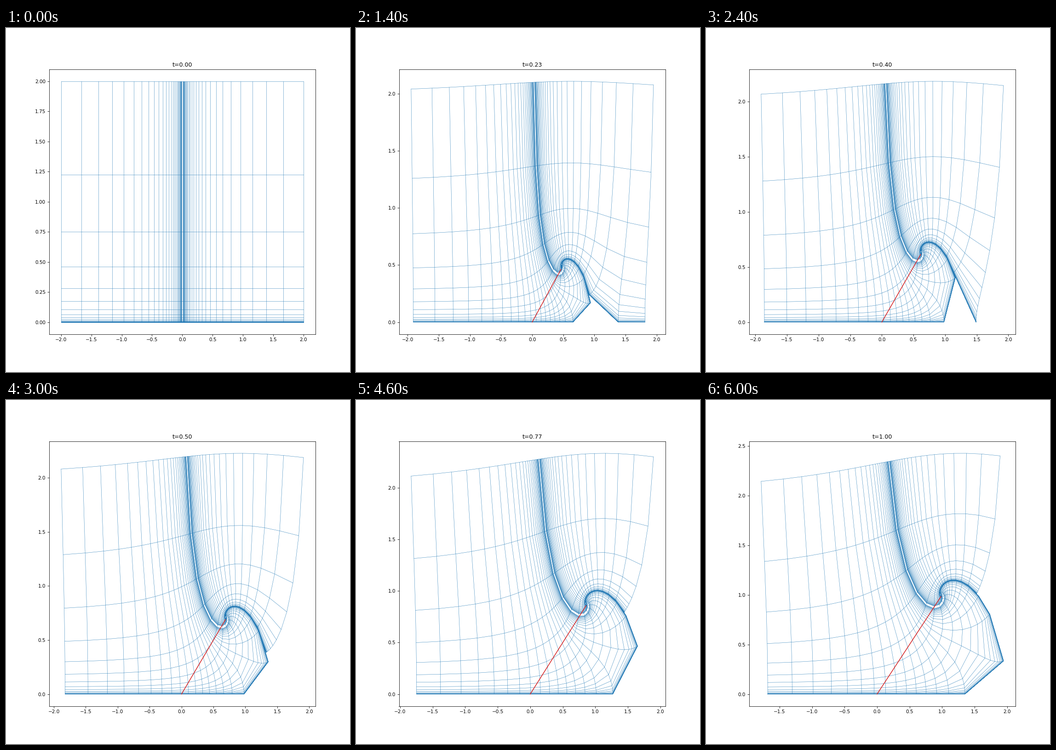
Animation of 748x748 px, one loop 6.1 s. Source, as a matplotlib script:

```python
import numpy as np
import matplotlib.pyplot as plt
from matplotlib.animation import FuncAnimation

INCHES, DPI = 10, 74.8
FRAMES = 61
INTERVAL = 100
BLUE, RED = "tab:blue", "tab:red"


def driving(s):
    """Driving term 2*sqrt(t), with s = sqrt(t)."""
    return 2 * s


def advance(z, t0, t1, n):
    """Flow dz/dt = -1 / (z - W(t)) as a chain of small slit maps."""
    s = np.linspace(np.sqrt(t0), np.sqrt(t1), n + 1)
    for a, b in zip(s[:-1], s[1:]):
        w = driving((a + b) / 2)
        h = np.sqrt(2 * (b * b - a * a))
        u = z - w
        # this product of roots stays in the upper half-plane
        z = w + np.sqrt(u - h) * np.sqrt(u + h)
    return z


def evolve(z, times):
    states = [z]
    for t0, t1 in zip(times[:-1], times[1:]):
        # the start is singular and needs finer steps
        n = 3000 if t0 == 0 else 150
        states.append(advance(states[-1], t0, t1, n))
    return states


x = np.geomspace(0.01, 2, 30)
y = np.geomspace(1e-8, 2, 40)
columns = np.concatenate([-x[::-1], x])

labels = np.linspace(0, 1, FRAMES)      # times shown in the title
times = np.arange(FRAMES) / FRAMES      # times reached by the flow
states = evolve(columns[None, :] + 1j * y[:, None], times)
trace = np.sqrt(times) * (1 + 1j)


def grid_curves(z):
    return [*z.T, *z]


fig, ax = plt.subplots(figsize=(INCHES, INCHES), dpi=DPI)
grid_lines = [ax.plot([], [], color=BLUE, lw=0.5)[0]
              for _ in grid_curves(states[0])]
tip_line, = ax.plot([], [], color=RED, lw=1.5)
title = ax.set_title("")


def update(i):
    z = states[i]
    for line, c in zip(grid_lines, grid_curves(z)):
        line.set_data(c.real, c.imag)
    tip_line.set_data(trace[:i].real, trace[:i].imag)
    title.set_text(f"t={labels[i]:.2f}")

    for set_lim, v in ((ax.set_xlim, z.real), (ax.set_ylim, z.imag)):
        pad = 0.05 * (v.max() - v.min())
        set_lim(v.min() - pad, v.max() + pad)
    return [*grid_lines, tip_line, title]


anim = FuncAnimation(fig, update, frames=FRAMES, interval=INTERVAL,
                     repeat=True, repeat_delay=0, blit=False)
plt.show()
```
